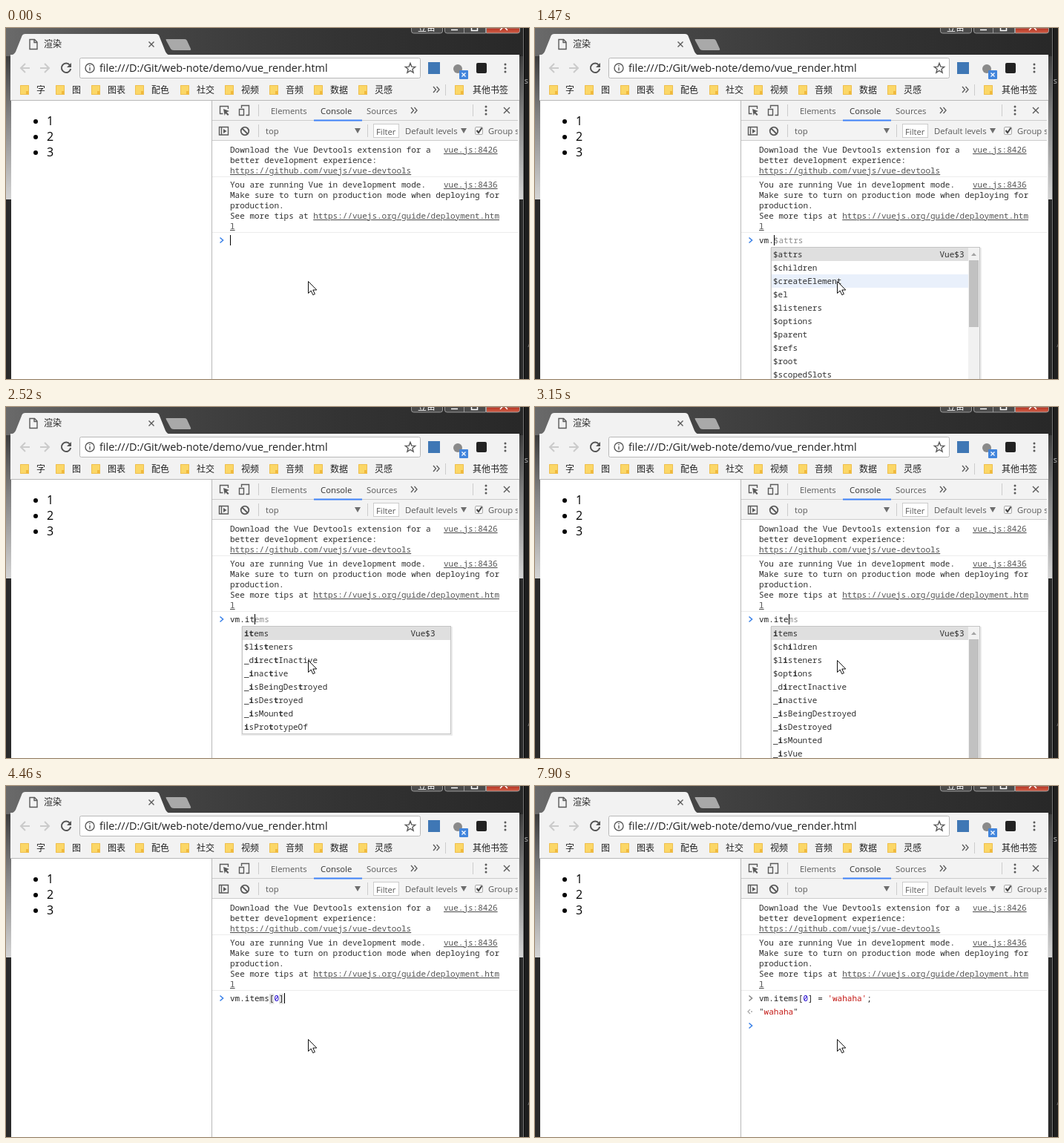
Recreate the animation shown at these times as an HTML page. Size 705x473 px, loop 8000 ms.

```html
<!DOCTYPE html>
<html lang="zh">
<head>
<meta charset="utf-8">
<title>渲染</title>
<style>
html, body { margin: 0; width: 100%; height: 100%; overflow: hidden; background: #fff; }
svg { display: block; position: absolute; left: 0; top: 0; }
text { white-space: pre; font-family: "Open Sans", "Noto Sans CJK SC", "Noto Sans CJK", sans-serif; }
.cjk { font-size: 12px; fill: #222; font-family: "Noto Sans CJK SC", "Noto Sans CJK", sans-serif; }
.ui { font-size: 11.3px; fill: #5a5a5a; }
.url { font-size: 14.4px; fill: #222; }
.page { font-size: 16px; fill: #000; }
.mono { font: 11px "Noto Sans Mono", "DejaVu Sans Mono", monospace; fill: #303030; }
.link { fill: #545454; text-decoration: underline; }
.bold { font-weight: 700; }
.icon { fill: none; stroke: #5a5a5a; stroke-width: 1.4; }
</style>
</head>
<body>
<svg id="stage" width="705" height="473" viewBox="0 0 705 473">
  <defs>
    <linearGradient id="bar" x2="1" y2="0">
      <stop offset="0" stop-color="#6a6a6a"/><stop offset=".3" stop-color="#444"/>
      <stop offset=".65" stop-color="#333"/><stop offset="1" stop-color="#282828"/>
    </linearGradient>
    <linearGradient id="edge" x2="0" y2="1">
      <stop offset="0" stop-color="#3c3c3c"/><stop offset=".4" stop-color="#808080"/>
      <stop offset="1" stop-color="#d4d4d4"/>
    </linearGradient>
    <linearGradient id="red" x2="0" y2="1">
      <stop offset="0" stop-color="#b5321f"/><stop offset="1" stop-color="#d2604a"/>
    </linearGradient>
    <clipPath id="tools"><rect x="278" y="98" width="412" height="375"/></clipPath>
    <g id="folder">
      <path d="M0 1h12v13H0z" fill="#fbd767"/>
      <path d="M8 9h4v5H8z" fill="#f0b93c"/>
      <path d="M.5 1.5h11v12H.5z" fill="none" stroke="#eebf50"/>
    </g>
    <path id="more" d="M0 0l3.5 4L0 8M4.5 0L8 4 4.5 8" fill="none" stroke="#5a5a5a" stroke-width="1.3"/>
    <g id="dots" fill="#5a5a5a"><circle cy="-5" r="1.5"/><circle r="1.5"/><circle cy="5" r="1.5"/></g>
    <path id="prompt" d="M288.5 282.5l4 3.5-4 3.5" fill="none" stroke-width="1.6"/>
  </defs>

  <!-- desktop and window frame -->
  <rect width="705" height="473" fill="#1e1e1e"/>
  <rect width="698" height="38" fill="url(#bar)"/>
  <rect y="38" width="698" height="193" fill="url(#edge)"/>
  <rect y="231" width="698" height="242" fill="#2a2a2a"/>
  <path d="M697.5 0v473" stroke="#777"/>
  <path d="M698.5 0v473" stroke="#0a0a0a"/>
  <text class="mono" x="698" y="75" style="fill:#aaa">s'</text>
  <text class="mono" x="702" y="430" style="fill:#777">/</text>
  <g stroke="#9a9a9a" fill="#4b4b4b">
    <path d="M546.5 0v4q0 3 3 3h36q3 0 3-3V0"/>
    <path d="M591.5 0v4q0 3 3 3h52V0M617.5 0v7"/>
    <path d="M647.5 0v7h42q3 0 3-3V0z" fill="url(#red)"/>
  </g>
  <text class="cjk" x="555" y="4" style="fill:#fff">豆苗</text>
  <path d="M600 2.5h9M627.500 0v3.500h8V0M666 3l3-3M676 3l-3-3" fill="none" stroke="#fff" stroke-width="1.500"/>

  <!-- tab strip -->
  <path d="M216 15h25q2 0 3 2l5 11q1 2-2 2h-21q-3 0-4-2l-6-11q-1-2 0-2z" fill="#a9a9a9"/>
  <path d="M6 37q5-1 7-5l8-20q1-4 5-4h176q4 0 5 4l8 20q2 4 6 5z" fill="#f2f2f2"/>
  <path d="M32 15.500h6.500l3.500 3.500v9.500H32zM38 15.500V19.500h4" class="icon"/>
  <text class="cjk" x="51" y="26">渲染</text>
  <path d="M192.500 18.500l7 7m0-7l-7 7" class="icon"/>

  <!-- toolbar and bookmarks -->
  <rect x="6" y="36" width="686" height="62" fill="#f2f2f2"/>
  <g fill="none" stroke="#cbcbcb" stroke-width="2">
    <path d="M32 54H20m6-6l-6 6 6 6M46 54h12m-6-6l6 6-6 6"/>
    <path d="M86 50a6.200 6.200 0 1 0 1.200 5" stroke="#555"/>
  </g>
  <path d="M88 47v6h-6z" fill="#555"/>
  <rect x="99.500" y="40.500" width="459" height="27" rx="2" fill="#fff" stroke="#b8b8b8"/>
  <circle cx="113" cy="54" r="6" class="icon"/>
  <path d="M113 53v4.500M113 50v1.500" class="icon"/>
  <text class="url" x="126" y="59">file:///D:/Git/web-note/demo/vue_render.html</text>
  <path id="star" class="icon"/>
  <rect x="569" y="46" width="16" height="16" fill="#3f77b5"/>
  <circle cx="609" cy="55" r="6" fill="#8a8a8a"/>
  <rect x="611" y="57" width="12" height="12" rx="1" fill="#4285dc"/>
  <path d="M614.500 60.500l5 5m0-5l-5 5" stroke="#fff" stroke-width="1.300"/>
  <rect x="634" y="47" width="14" height="14" rx="2" fill="#222"/>
  <use href="#dots" x="673" y="54"/>
  <g id="marks"></g>
  <use href="#more" x="576" y="79"/>
  <path d="M592.500 76v15" stroke="#ccc"/>
  <path d="M6 97.500h686" stroke="#b8b8b8"/>

  <!-- page -->
  <rect x="7" y="98" width="685" height="375" fill="#fff"/>
  <g id="list"></g>

  <!-- developer tools -->
  <g clip-path="url(#tools)">
    <rect x="278" y="98" width="414" height="54" fill="#f3f3f3"/>
    <path d="M278 124.500h414M278 151.500h414M340.500 103v16M629.500 103v16M340.500 130v17M487.500 130v17" stroke="#ccc"/>
    <path d="M415 124.500h65" stroke="#3e82f7" stroke-width="2"/>
    <path d="M299.500 109v-3.500h-11v10h4" class="icon"/>
    <path d="M293 109l8 3-3.500 1.500 3 3-1.500 1.500-3-3-1.300 3z" fill="#5a5a5a"/>
    <path d="M317.500 108v-3.500h10v13h-4M314.500 109.500h6v8h-6z" class="icon"/>
    <use href="#more" x="546" y="107"/>
    <use href="#dots" x="647" y="111"/>
    <path d="M671 107l8 8m0-8l-8 8" class="icon"/>
    <path d="M287.500 133.500h12v10.500h-12zM290.500 133v11" class="icon"/>
    <path d="M293 136l4.500 3-4.500 3z" fill="#5a5a5a"/>
    <circle cx="322" cy="139" r="5.300" class="icon" style="stroke-width:1.800"/>
    <path d="M318.500 135.500l7 7" class="icon" style="stroke-width:1.800"/>
    <path d="M470 135h8l-4 7zM613 135h8l-4 7z" fill="#6e6e6e"/>
    <rect x="495.500" y="129.500" width="34" height="18" fill="#fff" stroke="#ccc"/>
    <rect x="632.500" y="133.500" width="10" height="10" rx="1.500" fill="#f6f6f6" stroke="#aaa"/>
    <path d="M634.500 138l2.500 3 4.500-6.500" fill="none" stroke="#444" stroke-width="2"/>
    <g id="labels"></g>
    <path d="M278 200.500h414M278 275.500h414" stroke="#ececec"/>
    <g id="log"></g>
    <g id="live"></g>
  </g>
  <path d="M277.500 98v375" stroke="#b8b8b8"/>
  <path d="M691.500 98v375" stroke="#ddd"/>
  <path d="M407.500 341.500v16l3.700-3.500 2.600 5.700 2.600-1.200-2.600-5.500h5z" fill="#fff" stroke="#111"/>
</svg>

<script>
const $ = id => document.getElementById(id);
const esc = s => s.replace(/&/g, '&amp;').replace(/</g, '&lt;');
const text = (x, y, s, cls = 'mono', extra = '') =>
  `<text x="${x}" y="${y}" class="${cls}" ${extra}>${esc(s)}</text>`;
const rect = (x, y, w, h, fill, extra = '') =>
  `<rect x="${x}" y="${y}" width="${w}" height="${h}" fill="${fill}" ${extra}/>`;
const span = (s, fill) => `<tspan style="fill:${fill}">${esc(s)}</tspan>`;

// Static parts
$('star').setAttribute('d', 'M' + Array.from({ length: 10 }, (_, i) => {
  const r = i % 2 ? 3 : 7, a = i * Math.PI / 5;
  return `${(545 + r * Math.sin(a)).toFixed(1)} ${(54.5 - r * Math.cos(a)).toFixed(1)}`;
}).join('L') + 'z');

$('marks').innerHTML = [
  [19, '字'], [67, '图'], [115, '图表'], [174, '配色'], [235, '社交'], [295, '视频'],
  [355, '音频'], [415, '数据'], [475, '灵感'], [605, '其他书签']
].map(([x, s]) => `<use href="#folder" x="${x}" y="76"/>` + text(x + (x > 600 ? 24 : 22), 87.5, s, 'cjk')).join('');

$('list').innerHTML = [1, 2, 3].map(n => {
  const y = 110 + n * 21;
  return `<circle cx="40" cy="${y - 5}" r="3"/>` + text(55, y, String(n), 'page');
}).join('');

$('labels').innerHTML = [
  [357, 115.5, 'Elements'], [424, 115.5, 'Console'], [486, 115.5, 'Sources'],
  [350, 143, 'top'], [499, 143.5, 'Filter'], [538, 143, 'Default levels'], [650, 143, 'Group similar']
].map(([x, y, s]) => text(x, y, s, 'ui', s === 'Console' ? 'style="fill:#333"' : '')).join('');

$('log').innerHTML = [
  [168, 'Download the Vue Devtools extension for a'],
  [182, 'better development experience:'],
  [215, 'You are running Vue in development mode.'],
  [229, 'Make sure to turn on production mode when deploying for'],
  [243, 'production.'],
  [257, 'See more tips at ']
].map(([y, s]) => text(302, y, s)).join('') + [
  [302, 196, 'https://github.com/vuejs/vue-devtools'],
  [590, 168, 'vue.js:8426'], [590, 215, 'vue.js:8436'],
  [414.2, 257, 'https://vuejs.org/guide/deployment.htm'], [302, 271, 'l']
].map(([x, y, s]) => text(x, y, s, 'mono link')).join('');

// Suggestion lists; start is the index of the completed word in the input
const words = s => s.split(' ');
const globals = {
  start: 0, x: 298, right: 602, query: 'v', type: 'Window', hover: 2, thumb: 25,
  items: words('visualViewport vm ValidityState VisualViewport VTTCue Vue AnimationEvent ApplicationCacheErrorEvent AudioProcessingEvent BeforeInstallPromptEvent')
};
const single = { start: 0, x: 298, right: 392, query: 'vm', type: 'Window', items: ['vm'] };
const member = { start: 3, x: 318, right: 600, type: 'Vue$3' };
const all = {
  ...member, query: '', hover: 2, thumb: 90,
  items: words('$attrs $children $createElement $el $listeners $options $parent $refs $root $scopedSlots')
};
const withI = {
  ...member, query: 'i', thumb: 170,
  items: words('items $children $listeners $options _directInactive _inactive _isBeingDestroyed _isDestroyed _isMounted _isVue')
};
const shortItems = words('items $listeners _directInactive _inactive _isBeingDestroyed _isDestroyed _isMounted isPrototypeOf');
const withIt = { ...member, query: 'it', items: shortItems };
const withIte = { ...member, query: 'ite', items: shortItems };

// Marks the letters of the query, in order, in bold
function marked(word, query) {
  let k = 0;
  return [...word].map(c => {
    if (k < query.length && c.toLowerCase() === query[k]) {
      k++;
      return `<tspan class="bold">${c}</tspan>`;
    }
    return c;
  }).join('');
}

function drawPopup(p) {
  const w = p.right - p.x, h = p.items.length * 18 + 2, bar = p.right - 16;
  let out = rect(p.x - 1, 296, w + 3, h + 1, '#000', 'opacity=".08" rx="1"') +
    rect(p.x + .5, 295.5, w - 1, h - 1, '#fff', 'stroke="#c4c4c4"');
  const inner = p.thumb ? w - 17 : w - 2;
  p.items.forEach((word, i) => {
    const y = 296 + i * 18;
    if (i === 0) out += rect(p.x + 1, y, inner, 18, '#dfdfdf');
    else if (i === p.hover) out += rect(p.x + 1, y, inner, 18, '#e9f0fb');
    out += `<text class="mono" x="${p.x + 3}" y="${y + 13}">${marked(word, p.query)}</text>`;
  });
  out += text(p.right - (p.thumb || p.start ? 21.500 : 5), 309, p.type, 'mono', 'text-anchor="end"');
  if (p.thumb) {
    out += rect(bar, 296, 15, h, '#f1f1f1') + rect(bar + 1, 313, 13, p.thumb, '#c1c1c1') +
      `<path d="M${bar + 4} 307h7l-3.500-4z" fill="#a3a3a3"/>`;
  }
  return out;
}

const at = n => 302 + n * 6.6;

function colored(code) {
  return code.match(/'[^']*'?|\d|[^'\d]+/g)
    .map(s => span(s, s[0] === "'" ? '#c41a16' : /\d/.test(s) ? '#1c00cf' : '#222')).join('');
}
const codeLine = (code, rest = '') =>
  `<text class="mono" x="302" y="290">${code ? colored(code) : ''}${rest}</text>`;
const chevron = (dy, stroke) => `<use href="#prompt" y="${dy}" stroke="${stroke}"/>`;
const caretAt = (n, dy = 0) => rect(Math.round(at(n)), 279 + dy, 1, 14, '#000');

function drawInput({ code, popup, tail = '', caret = true, brackets }) {
  let ghost = '';
  if (popup) {
    const word = code.slice(popup.start), first = popup.items[0];
    if (first.startsWith(word)) ghost = first.slice(word.length);
  }
  const full = code + tail;
  let out = chevron(0, '#3b82e8');
  if (brackets) {
    for (const c of '[]') out += rect(at(full.indexOf(c)), 280, 6.6, 14, '#e2e2e2');
  }
  out += codeLine(full, ghost && span(ghost, '#8a8a8a'));
  if (caret) out += caretAt(code.length);
  return out + (popup ? drawPopup(popup) : '');
}

function drawResult({ code, result, caret = true }) {
  const dy = result ? 37 : 18;
  let out = chevron(0, '#8a8a8a') + codeLine(code) + chevron(dy, '#3b82e8');
  if (result) {
    out += '<path d="M290 301l-3 3 3 3" fill="none" stroke="#aaa" stroke-width="1.300"/>' +
      '<circle cx="292" cy="304" r="1" fill="#aaa"/>' +
      `<text class="mono" x="302" y="308">"${span('wahaha', '#c41a16')}"</text>`;
  }
  return out + (caret ? caretAt(0, dy) : '');
}

const line = "vm.items[0] = 'wahaha';";
const typed = (n, popup, more) => ({ code: line.slice(0, n), popup, ...more });
const steps = [
  [0, typed(0)],
  [260, typed(0, null, { caret: false })],
  [730, typed(1)],
  [930, typed(1, globals)],
  [1040, typed(2, globals)],
  [1120, typed(2, single)],
  [1390, typed(3, single)],
  [1470, typed(3, all)],
  [1930, typed(4, all)],
  [2050, typed(4, withI)],
  [2420, typed(5, withI)],
  [2520, typed(5, withIt)],
  [2980, typed(6, withIt)],
  [3150, typed(6, withI)],
  [3260, typed(6, withIte)],
  [3430, typed(7, withI)],
  [3550, typed(8, withIte)],
  [3820, typed(9, withIte, { tail: ']', brackets: true })],
  [4000, typed(9, null, { tail: ']', brackets: true })],
  [4180, typed(10, null, { tail: ']', brackets: true })],
  [4460, typed(11, null, { brackets: true })],
  [4840, typed(12)],
  [4930, typed(13)],
  [5020, typed(14)],
  [5300, typed(15)],
  [5850, typed(17)],
  [5950, typed(18)],
  [6050, typed(20)],
  [6150, typed(21)],
  [6410, typed(22)],
  [6780, typed(23)],
  [7340, { code: line, sent: true }],
  [7440, { code: line, sent: true, result: true }],
  [7900, { code: line, sent: true, result: true, caret: false }]
];

let shown = -1;
function render() {
  const t = performance.now() % 8000;
  let i = steps.length - 1;
  while (steps[i][0] > t) i--;
  if (i !== shown) {
    const state = steps[i][1];
    $('live').innerHTML = state.sent ? drawResult(state) : drawInput(state);
    shown = i;
  }
  requestAnimationFrame(render);
}
render();
</script>
</body>
</html>
```
